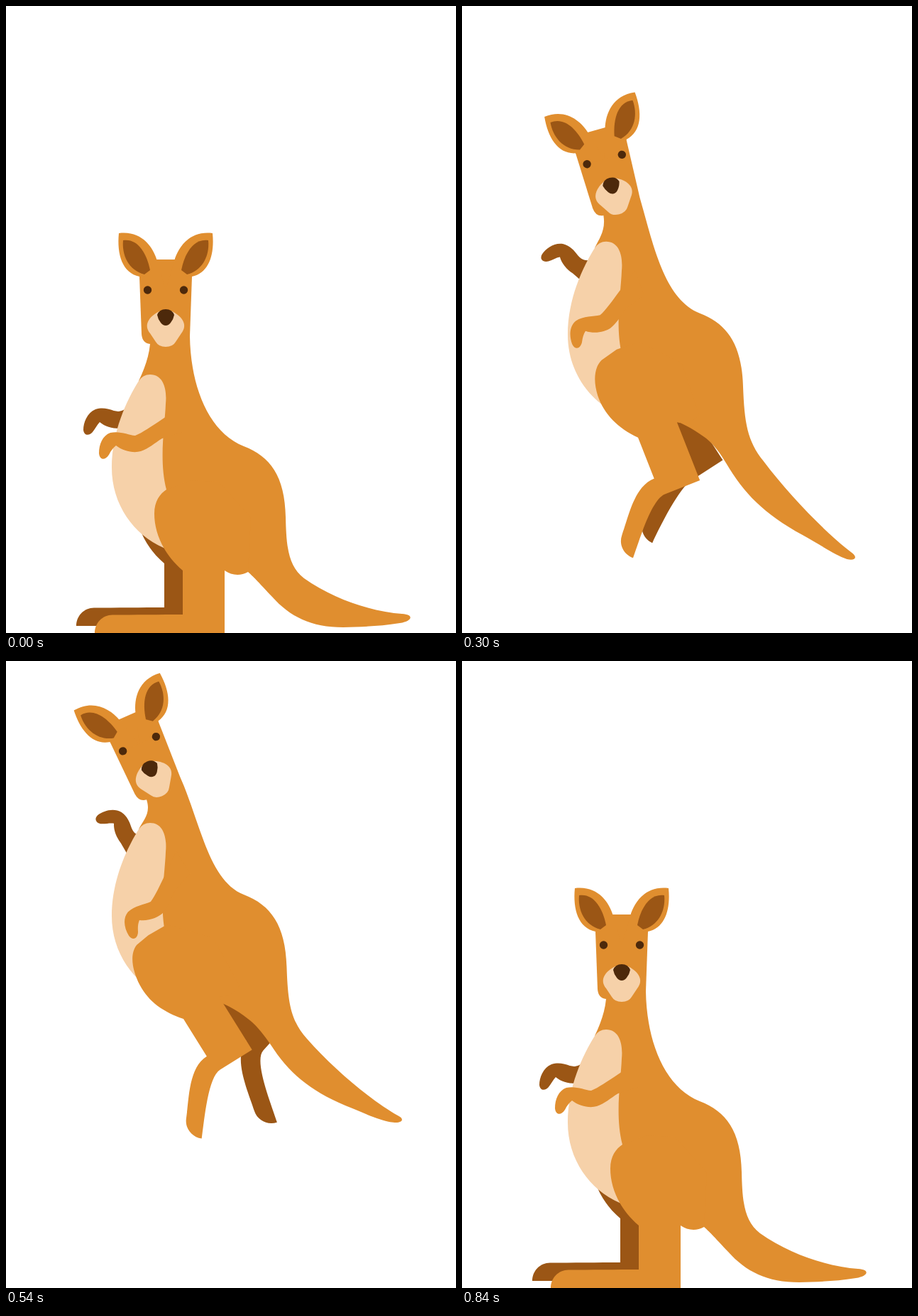
An HTML page for the animation above (1070 ms loop, 634 by 883 pixels).

```html
<!DOCTYPE html>
<html lang="en">
<head>
<meta charset="utf-8">
<title>Jumping kangaroo</title>
<style>
  html, body { margin: 0; width: 100%; height: 100%; overflow: hidden; background: #fff; }
  svg { display: block; width: 634px; height: 883px; }
  .coat { fill: #e08e2f; }
  .shade { fill: #9b5615; }
  .cream { fill: #f6d1a9; }
  .nose { fill: #4d290b; }
</style>
</head>
<body>
<svg viewBox="0 0 634 883">
  <defs>
    <g id="ear">
      <path class="coat" d="M159 320C190 316 207 338 213 359L225 400H195L188 381C164 376 156 350 159 320Z"/>
      <path class="shade" d="M165 330C185 327 198 347 203 372L195 378C172 372 163 350 165 330Z"/>
      <circle class="nose" cx="199.5" cy="400" r="5.7"/>
    </g>
  </defs>
  <g id="roo">
    <path id="backLeg" class="shade"/>
    <path id="backArm" class="shade" d="M215 550L167 568C160 572 157 571 152 570C143 567 136 565 126 568C114 573 109 587 109 597C110 606 118 605 122 600C126 595 128 590 132 586C139 592 149 595 160 595L200 600Z"/>
    <path id="torso" class="coat"/>
    <path class="cream" d="M203 519C222 519 227 540 225 560C224 590 215 640 226 681L228 766L222 763C180 745 149 702 149 650C149 600 170 555 187 528Q193 519 203 519Z"/>
    <path id="frontLeg" class="coat"/>
    <path id="frontArm" class="coat" d="M250 562L220 582C205 592 192 601 182 605C172 604 160 598 147 601C136 605 131 617 131 630C132 640 140 640 145 632C148 626 151 622 155 619C165 627 180 630 190 627C200 624 210 615 220 609L250 600Z"/>
    <g id="head">
      <path class="coat" d="M212 357H238L262 381L259 465L203 476Q192 475 191 462L188 381Z"/>
      <use href="#ear"/>
      <use href="#ear" transform="matrix(-1 0 0 1 450 0)"/>
      <path class="cream" d="M225 430H216C200 438 194 450 203 461L211 473Q215 480 225 480Q235 480 239 473L247 461C256 450 250 438 234 430Z"/>
      <path class="nose" d="M213 435Q216 427 225 427Q234 427 237 435Q236 441 232 446Q229 450 225 450Q221 450 218 446Q214 441 213 435Z"/>
    </g>
  </g>
</svg>
<script>
const STEP = 30, LOOP = 1070, LAST = 28, PEAK = 17, TAIL_PEAK = 12, JUMP = 297;
const $ = id => document.getElementById(id);

// Poses of the legs, in steps of 30 ms
const keys = [0, 4, 10, 14, 18, 22, 28];
const front = {
  turn: [0, -3, -21.5, -33, -32, -17.8, 0],
  bend: [0, 0, 49, 63, 50, 22, 0],
  shift: [0, 5, -1, -6, 1, 5, 0]
};
const back = {
  turn: [0, -7, -33, -46, -48, -28, 0],
  bend: [0, 0, 32, 66, 60, 30, 0],
  shift: [0, 13, 47, 70, 70, 43, 0]
};

const thigh = [
  "M249 795C222 772 209 742 209 715C209 697 217 687 226 681L260 668L300 670",
  "M249 795C231 772 221 750 223 722C225 700 233 677 250 671L270 669L300 670"
];
// Hip, tail and its underside, at rest and hanging
const tail = [
  "C372 634 393 662 394 720C395 760 397 788 420 806C465 838 520 853 558 856C575 857 573 866 555 869C525 874 500 874 475 875C430 875 400 860 375 832C358 814 350 805 341 797",
  "C374 635 394 664 396 722C398 775 402 800 425 829C462 879 515 934 550 961C557 967 553 972 542 969C525 963 505 948 480 934C425 903 397 874 372 831C361 812 350 800 341 794"
];

// Blends two paths of the same structure
function mix([a, b], k) {
  const ends = b.match(/\d+/g);
  let i = 0;
  return a.replace(/\d+/g, v => (+v + (ends[i++] - v) * k).toFixed(2));
}

// Cubic ease with end heights 0 and 1
function ease(x, x1 = .33, x2 = .67) {
  let lo = 0, hi = 1;
  for (let i = 0; i < 24; i++) {
    const t = (lo + hi) / 2, s = 1 - t;
    if (3 * s * s * t * x1 + 3 * s * t * t * x2 + t * t * t < x) lo = t; else hi = t;
  }
  return lo * lo * (3 - 2 * lo);
}

const swing = (n, peak, x2) =>
  n < peak ? ease(n / peak) : 1 - ease((n - peak) / (LAST - peak), .33, x2);

// Smooth curve through the keyed values, without overshoot
function curve(values, n) {
  const slope = i => (values[i + 1] - values[i]) / (keys[i + 1] - keys[i]);
  const tangent = i => {
    if (i === 0 || i === keys.length - 1) return 0;
    const a = slope(i - 1), b = slope(i);
    return a * b > 0 ? 2 * a * b / (a + b) : 0;
  };
  let i = 0;
  while (i < keys.length - 2 && n > keys[i + 1]) i++;
  const w = keys[i + 1] - keys[i], t = (n - keys[i]) / w, s = 1 - t;
  return s * s * (1 + 2 * t) * values[i] + t * t * (3 - 2 * t) * values[i + 1]
    + w * s * t * (s * tangent(i) - t * tangent(i + 1));
}

function legPath(turn, bend) {
  const a = bend * Math.PI / 180, c = Math.cos(a), s = Math.sin(a);
  const x = 125 + 1.13 * bend, y = 883 + 1.37 * bend;
  // u runs back along the foot, v out of its upper side
  const p = (u, v) => `${(x + u * c - v * s).toFixed(2)} ${(y - u * s - v * c).toFixed(2)} `;
  return mix(thigh, Math.min(1, -turn / 34))
    + "L345 720L341 797C330 803 318 802 308 795V883H255"
    + "C235 883 " + p(30, 0) + p(0, 0)
    + "C" + p(0, 14) + p(11, 25.5) + p(25, 25.5)
    + "C" + p(55, 25.5) + "219 857 249 857Z";
}

function setLeg(id, pose, n, x, y) {
  const turn = curve(pose.turn, n);
  $(id).setAttribute("d", legPath(turn, curve(pose.bend, n)));
  $(id).setAttribute("transform", `translate(${x + curve(pose.shift, n)} ${y}) rotate(${turn} 249 795)`);
}

function torsoPath(angle, bend) {
  const a = angle * Math.PI / 180, c = Math.cos(a), s = Math.sin(a);
  const neck = (x, y) => {
    x -= 225; y -= 493;
    return `${(225 + x * c - y * s).toFixed(2)} ${(493 + x * s + y * c).toFixed(2)} `;
  };
  return "M187 528C193 515 " + neck(201, 497) + neck(203, 476)
    + "L" + neck(225, 440) + "L" + neck(259, 465)
    + "C" + neck(260, 535) + "285 600 335 620"
    + mix(tail, bend)
    + "C325 782 305 772 290 768L230 755L215 700L200 560Z";
}

function draw(n) {
  const lean = swing(n, PEAK), angle = -24 * lean;
  const rotate = (id, deg, x, y) => $(id).setAttribute("transform", `rotate(${deg} ${x} ${y})`);
  $("roo").setAttribute("transform", `translate(0 ${-JUMP * swing(n, PEAK, 1)})`);
  rotate("head", angle, 225, 493);
  rotate("backArm", 54 * lean, 209, 573);
  rotate("frontArm", -31.7 * lean, 238, 578);
  $("torso").setAttribute("d", torsoPath(angle, 1.05 * swing(n, TAIL_PEAK)));
  setLeg("frontLeg", front, n, 0, 0);
  setLeg("backLeg", back, n, -26, -10);
}

const start = performance.now();
function tick() {
  const t = (performance.now() - start) % LOOP;
  draw(Math.min(LAST, Math.floor(t / STEP)));
  requestAnimationFrame(tick);
}
tick();
</script>
</body>
</html>
```
